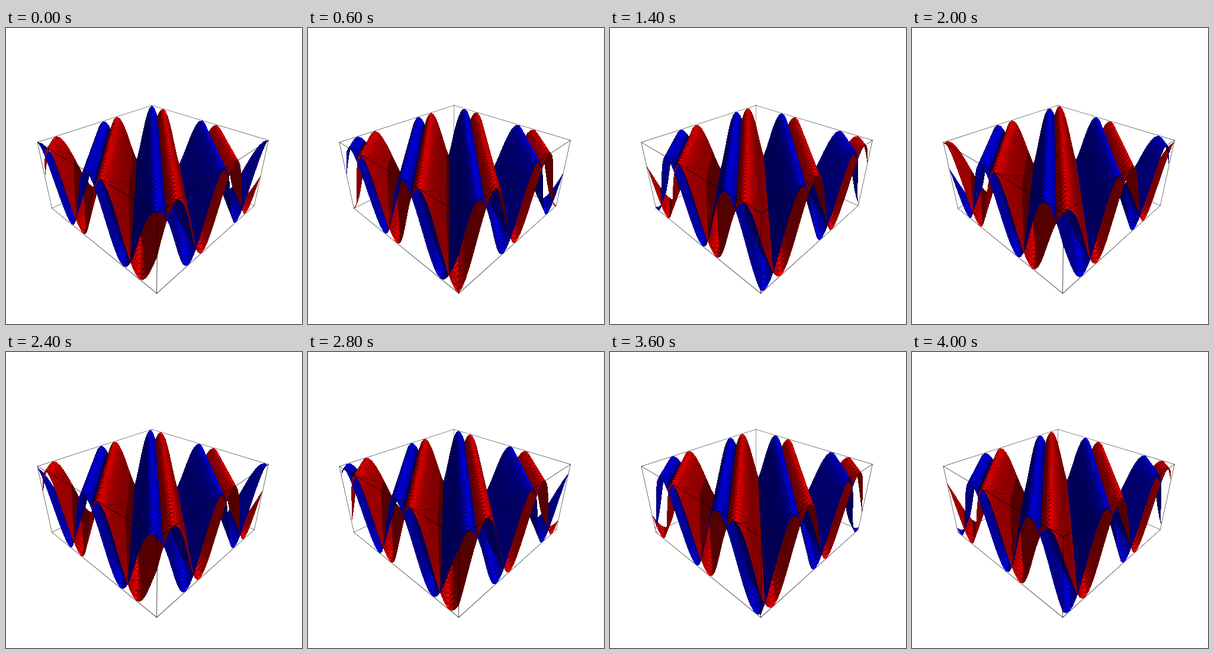
A matplotlib script for the animation above (4.2 s loop, 500 by 500 pixels).

```python
import numpy as np
import matplotlib.pyplot as plt
from itertools import product
from matplotlib.animation import FuncAnimation

SIZE, FRAMES, INTERVAL = 500, 21, 200
CELLS, STEP = 40, 0.05
EYE = np.array([2.3, 2.4, 2.0])
LIGHT = np.array([4.0, 3.0, 2.0])
AMBIENT, DIFFUSE = 1 / 3, 2 / 3
EDGE_RADIUS = 0.002
COLORS = np.array([[0, 0, 1.0], [1.0, 0, 0]])
# Pixel on the optical axis: rays pass through pixel corners.
AXIS_X, AXIS_Y = SIZE / 2 - 1, SIZE / 2


def unit(v):
    return v / np.linalg.norm(v, axis=-1, keepdims=True)


# Camera basis, mirrored left to right.
forward = unit(-EYE)
right = unit(np.cross([0, 0, 1], forward))
up = np.cross(forward, right)
BASIS = np.array([right, up, forward])

cols, rows = np.meshgrid(np.arange(SIZE), np.arange(SIZE))
RAYS = ((cols - AXIS_X)[..., None] / SIZE * right
        + (AXIS_Y - rows)[..., None] / SIZE * up + forward).reshape(-1, 3)

BOX_EDGES = []
for axis in range(3):
    for a, b in product((-1, 1), repeat=2):
        ends = np.insert(np.array([[a, b], [a, b]], float), axis, [-1, 1], axis=1)
        BOX_EDGES.append(ends * [1, 1, 0.5])


def edge_distance(origin, rays, edge):
    """Ray parameter closest to a box edge, and the distance there."""
    start, span = edge[0], edge[1] - edge[0]
    w = origin - start
    a, b, c = (rays * rays).sum(-1), rays @ span, span @ span
    d, e = (rays * w).sum(-1), w @ span
    den = a * c - b * b + 1e-12
    s = (b * e - c * d) / den
    t = np.clip((a * e - b * d) / den, 0, 1)
    gap = w + s[:, None] * rays - t[:, None] * span
    return s, np.sqrt((gap * gap).sum(-1))


# Depth and pixel coverage of every box edge, the same in all frames.
EDGE_LAYERS = []
for edge in BOX_EDGES:
    s, gap = edge_distance(EYE, RAYS, edge)
    radius = EDGE_RADIUS * SIZE / s
    cover = np.clip(radius + 0.5 - gap * SIZE / s, 0, np.minimum(2 * radius, 1))
    pixels = np.flatnonzero(cover)
    EDGE_LAYERS.append((pixels, s[pixels], cover[pixels]))

# Each grid cell is split across the ridges, which gives the crests their scales.
ci, cj = (g.ravel() for g in np.meshgrid(np.arange(CELLS), np.arange(CELLS)))
CORNERS = np.concatenate([
    np.stack([np.stack([ci + a, cj + b], -1) for a, b in tri], 1)
    for tri in (((0, 0), (1, 0), (0, 1)), ((1, 1), (0, 1), (1, 0)))])
DIAGONALS = np.arange(-CELLS - 2, CELLS + 3)
OFFSET = CELLS + 2


def profiles(t):
    """Heights of both waves on each grid diagonal, fitted to the box."""
    angle = 2 * np.pi * STEP * DIAGONALS - t
    waves = np.array([np.cos(angle), np.sin(angle)])
    return 0.5 * waves / np.abs(waves).max()


def height(profile, x, y):
    u, v = (x + 1) / STEP, (y + 1) / STEP
    i = np.clip(np.floor(u), 0, CELLS - 1).astype(int)
    j = np.clip(np.floor(v), 0, CELLS - 1).astype(int)
    a, b = u - i, v - j
    far = a + b > 1
    a, b = np.where(far, 1 - b, a), np.where(far, 1 - a, b)
    d = i - j + OFFSET
    return (1 - a - b) * profile[d] + a * profile[d + 1] + b * profile[d - 1]


def mesh(profile):
    z = profile[CORNERS[..., 0] - CORNERS[..., 1] + OFFSET]
    return np.concatenate([CORNERS * STEP - 1, z[..., None]], -1)


def rasterize(tris):
    """Nearest triangle and its depth for every pixel (-1 where empty)."""
    q = (tris - EYE) @ BASIS.T
    w = q[..., 2]
    x = AXIS_X + q[..., 0] / w * SIZE
    y = AXIS_Y - q[..., 1] / w * SIZE
    bary = np.linalg.inv(np.stack([x, y, np.ones_like(x)], 1))
    inverse_w = np.einsum('ni,nij->nj', 1 / w, bary)

    x0, y0 = np.ceil(x.min(1)).astype(int), np.ceil(y.min(1)).astype(int)
    wide = np.maximum(np.floor(x.max(1)).astype(int) - x0 + 1, 0)
    tall = np.maximum(np.floor(y.max(1)).astype(int) - y0 + 1, 0)
    count = wide * tall
    tri = np.repeat(np.arange(len(tris)), count)
    k = np.arange(count.sum()) - np.repeat(np.cumsum(count) - count, count)
    px, py = x0[tri] + k % wide[tri], y0[tri] + k // wide[tri]

    inside = np.ones(len(tri), bool)
    for corner in range(3):
        cx, cy, c1 = bary[:, corner].T
        inside &= cx[tri] * px + cy[tri] * py + c1[tri] >= -1e-7
    tri, px, py = tri[inside], px[inside], py[inside]
    iw = inverse_w[tri, 0] * px + inverse_w[tri, 1] * py + inverse_w[tri, 2]

    order = np.argsort(iw)
    pixel = (py * SIZE + px)[order]
    owner = np.full(SIZE * SIZE, -1)
    depth = np.full(SIZE * SIZE, np.inf)
    owner[pixel] = tri[order]
    depth[pixel] = 1 / iw[order]
    return owner, depth


def is_lit(points, to_light, wave, side, heights):
    """March towards the light until leaving the box."""
    limits = (np.array([1, 1, 0.5]) - points) / to_light
    reach = np.clip(limits.min(1), 0, 1)
    s = reach[:, None] * np.linspace(0.004, 1, 32) ** 1.4
    x, y, z = (points[:, k, None] + s * to_light[:, k, None] for k in range(3))
    lit = np.ones(len(points), bool)
    for k in range(2):
        gap = z - height(heights[k], x, y)
        own = (gap * side[:, None] > -1e-3).all(1)
        other = (gap > -1e-4).all(1) | (gap < 1e-4).all(1)
        lit &= np.where(wave == k, own, other)
    for edge in BOX_EDGES:
        s, gap = edge_distance(points, to_light, edge)
        lit &= ~((gap < EDGE_RADIUS) & (s > 0.003))
    return lit


def render(t):
    heights = profiles(t)
    tris = np.concatenate([mesh(h) for h in heights])
    owner, depth = rasterize(tris)
    normals = unit(np.cross(tris[:, 1] - tris[:, 0], tris[:, 2] - tris[:, 0]))

    image = np.ones((SIZE * SIZE, 3))
    seen = np.flatnonzero(owner >= 0)
    tri = owner[seen]
    points = EYE + RAYS[seen] * depth[seen, None]
    wave = tri // len(CORNERS)
    normal = normals[tri]
    side = -np.sign((normal * RAYS[seen]).sum(1))
    to_light = LIGHT - points
    glow = side * (normal * unit(to_light)).sum(1)

    facing = np.flatnonzero(glow > 0)
    lit = is_lit(points[facing], to_light[facing], wave[facing],
                 side[facing], heights)
    shade = np.full(len(seen), AMBIENT)
    shade[facing] += DIFFUSE * glow[facing] * lit
    image[seen] = COLORS[wave] * shade[:, None]

    for pixels, edge_depth, cover in EDGE_LAYERS:
        in_front = edge_depth < depth[pixels] + EDGE_RADIUS
        image[pixels] *= 1 - (cover * in_front)[:, None]
    return image.reshape(SIZE, SIZE, 3)


fig = plt.figure(figsize=(5, 5), dpi=100, facecolor='white')
ax = fig.add_axes([0, 0, 1, 1])
ax.axis('off')
picture = ax.imshow(np.ones((SIZE, SIZE, 3)), interpolation='nearest',
                    aspect='auto')


def update(frame):
    picture.set_data(render(0.5 * frame))
    return [picture]


anim = FuncAnimation(fig, update, frames=FRAMES, interval=INTERVAL,
                     repeat=True, repeat_delay=0, blit=False)
plt.show()
```
